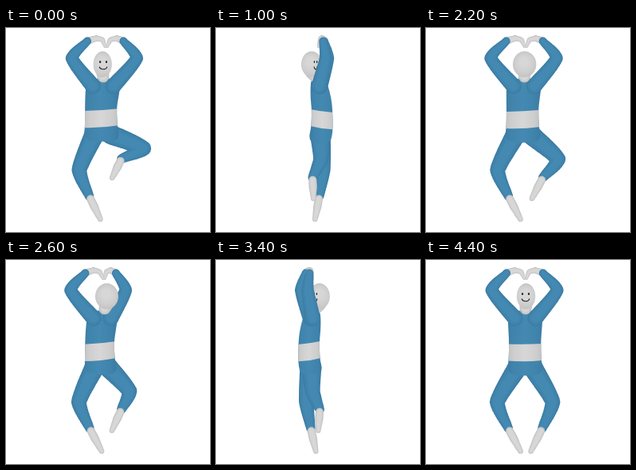
Animation of 256x256 px, one loop 4.6 s. Source, as an HTML page with a canvas:

```html
<!DOCTYPE html>
<html lang="en">
<head>
<meta charset="utf-8">
<title>Pirouette</title>
<style>
  html, body { margin: 0; width: 100%; height: 100%; overflow: hidden; background: #fff; }
  canvas { display: block; width: 256px; height: 256px; }
</style>
</head>
<body>
<canvas id="stage" width="256" height="256"></canvas>
<script>
const ctx = document.getElementById('stage').getContext('2d');
const STEP = 200, STEPS = 23;
const BLUE = ['#3c7ca4', '#4084ac', '#4489b2'];
const WHITE = ['#c1c1c1', '#cecece', '#d7d7d7'];
const LAYERS = [1, 0.84, 0.55];

// Torso rows from neck to crotch: height, half width, half depth, forward offset, sway
const TORSO = [
  [63, 13, 8, 3, 3], [72, 22, 11, 4.5, 4], [88, 21, 13, 6.5, 6],
  [103, 20, 13, 8, 7.5], [126, 20.5, 13.5, 8, 7], [137, 22.5, 14.5, 6, 6], [145, 17, 12, 6, 5]
];

const mix = (a, b, k) => a + (b - a) * k;

// Halfway between straight segments and a Catmull-Rom curve
function bend(a, b, c, d, k) {
  const curve = b + 0.5 * k * (c - a + k * (2 * a - 5 * b + 4 * c - d + k * (3 * (b - c) + d - a)));
  return mix(mix(b, c, k), curve, 0.45);
}

// A soft tapered tube through points of the form [x, y, radius]
function tube(points, colors) {
  const at = i => points[Math.max(0, Math.min(points.length - 1, i))];
  LAYERS.forEach((size, layer) => {
    ctx.fillStyle = colors[layer];
    ctx.beginPath();
    for (let i = 0; i < points.length - 1; i++) {
      for (let j = 0; j <= 24; j++) {
        const [x, y, r] = [0, 1, 2].map(c =>
          bend(at(i - 1)[c], at(i)[c], at(i + 1)[c], at(i + 2)[c], j / 24));
        ctx.moveTo(x + r * size, y);
        ctx.arc(x, y, r * size, 0, 7);
      }
    }
    ctx.fill();
  });
}

function smoothPath(points) {
  const n = points.length;
  const mid = i => [0, 1].map(c => (points[i % n][c] + points[(i + 1) % n][c]) / 2);
  ctx.beginPath();
  ctx.moveTo(...mid(0));
  for (let i = 1; i <= n; i++) ctx.quadraticCurveTo(...points[i % n], ...mid(i));
  ctx.closePath();
}

function getPose(n) {
  const turn = (n / STEPS) * 2 * Math.PI + 0.17;
  const swing = Math.cos(n * Math.PI / 4);
  const pose = { cos: Math.cos(turn), sin: Math.sin(turn), swing, lean: swing * Math.abs(swing) };
  pose.lift = 2.5 * Math.abs(pose.lean);
  // side and forward offsets become a screen position
  pose.x = (side, forward, sway = 0) =>
    125 + (side - sway * pose.lean) * pose.cos + forward * pose.sin;
  return pose;
}

function drawLeg(pose, side) {
  const up = Math.max(0, side * pose.swing) ** 2;
  const p = (u, v, y, r, sway) => [pose.x(side * u, v, sway), y, r];
  const hip = p(10.5, 6, 136 - pose.lift, 12.5, 5);
  const knee = p(mix(35, 47, up), 8, mix(178, 151, up), 9.5);
  const ankle = p(mix(21.5, 22, up), mix(4, -10, up), mix(211, 164, up), 5.8);
  const toe = p(mix(6.5, 9, up), mix(-1, -4, up), mix(240, 188, up), 3.2);
  const between = (k, r) => [mix(ankle[0], toe[0], k), mix(ankle[1], toe[1], k), r];
  tube([hip, knee, ankle], BLUE);
  tube([between(0.12, 5), between(0.45, 5.2), toe], WHITE);
}

function drawArm(pose, side) {
  const p = (u, v, y, r, sway) => [pose.x(side * u, v, sway), y, r];
  const wrist = p(23, 10, 16.5, 5, 2);
  tube([wrist, p(13, 8, 13, 3.6), p(5, 6, 15, 3), p(1.5, 4, 23, 2)], WHITE);
  tube([p(13, 5, 73, 10, 4), p(41.5, 14, 38, 7.8, 4), wrist], BLUE);
}

function drawTorso(pose) {
  const edge = sign => TORSO.map(([y, w, d, v, sway]) => [
    pose.x(0, v, sway) + sign * Math.hypot(w * pose.cos, d * pose.sin),
    y - pose.lift * (y > 90)
  ]);
  const left = edge(-1), right = edge(1);
  const x0 = left[3][0], x1 = right[3][0];
  const shade = colors => {
    const g = ctx.createLinearGradient(x0 - 2, 0, x1 + 2, 0);
    [0, 0.18, 0.5, 0.82, 1].forEach((stop, i) => g.addColorStop(stop, colors[2 - Math.abs(i - 2)]));
    return g;
  };
  ctx.save();
  smoothPath([...left, ...right.reverse()]);
  ctx.fillStyle = shade(BLUE);
  ctx.fill();
  ctx.clip();

  const top = 105 - pose.lift, bottom = 127 - pose.lift;
  const tilt = 2.5 * pose.sin - 2 * pose.lean * pose.cos;
  const mid = (x0 + x1) / 2;
  ctx.beginPath();
  ctx.moveTo(x0 - 5, top - tilt);
  ctx.quadraticCurveTo(mid, top + 1.5, x1 + 5, top + tilt);
  ctx.lineTo(x1 + 5, bottom + tilt - 1);
  ctx.quadraticCurveTo(mid, bottom + 1.5, x0 - 5, bottom - tilt - 1);
  ctx.fillStyle = shade(WHITE);
  ctx.fill();
  ctx.restore();
}

function drawHead(pose) {
  const x = pose.x(0, -5, 3), y = 45.5, rx = 13.2 - 1.5 * pose.cos;
  tube([[x, 56, 8], [mix(x, pose.x(0, 3, 3), 0.6), 61, 7.5]], WHITE);
  const skin = ctx.createRadialGradient(x - 1, y - 4, 2, x, y, 17);
  WHITE.slice().reverse().forEach((c, i) => skin.addColorStop([0.2, 0.65, 1][i], c));
  ctx.fillStyle = skin;
  ctx.beginPath();
  ctx.ellipse(x, y, rx, 16.2, 0, 0, 7);
  ctx.fill();
  if (pose.cos < -0.15) return;

  const faceX = x + 5 * pose.sin, width = Math.max(0.4, pose.cos);
  ctx.fillStyle = ctx.strokeStyle = '#222';
  for (const side of [-1, 1]) {
    ctx.beginPath();
    ctx.ellipse(faceX + side * 4 * width, 42.5, 1.1 * Math.sqrt(width), 1.5, 0, 0, 7);
    ctx.fill();
  }
  ctx.lineWidth = 1.1;
  ctx.lineCap = 'round';
  ctx.beginPath();
  ctx.ellipse(faceX, 48.2, 4.9 * width, 3.6, 0, 0.2, Math.PI - 0.2);
  ctx.stroke();
}

function draw(n) {
  const pose = getPose(n);
  const near = pose.sin > 0 ? -1 : 1;
  ctx.clearRect(0, 0, 256, 256);
  drawLeg(pose, -near);
  drawLeg(pose, near);
  drawTorso(pose);
  const armDepth = side => 12 * pose.cos - side * 42 * pose.sin;
  [
    [armDepth(-1), () => drawArm(pose, -1)],
    [armDepth(1), () => drawArm(pose, 1)],
    [-6 * pose.cos, () => drawHead(pose)]
  ].sort((a, b) => a[0] - b[0]).forEach(([, paint]) => paint());
}

let shown = -1;
function tick() {
  const n = Math.floor(performance.now() / STEP) % STEPS;
  if (n !== shown) draw(shown = n);
  requestAnimationFrame(tick);
}
tick();
</script>
</body>
</html>
```
